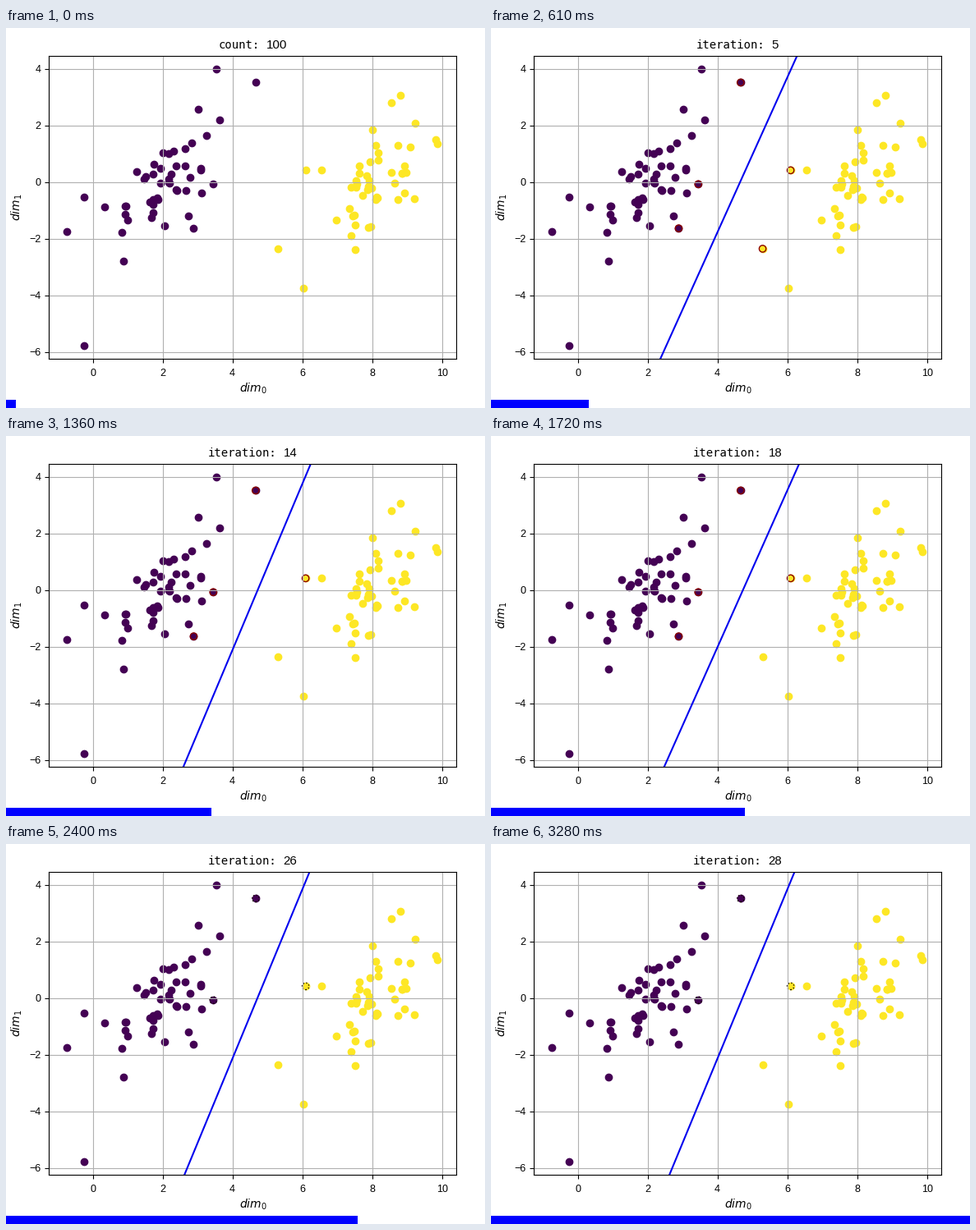
These frames come from a looping animation (583 by 463 pixels, 3350 ms). A matplotlib script:

```python
import numpy as np
import matplotlib.pyplot as plt
from matplotlib.animation import FuncAnimation
from matplotlib.patches import Rectangle

W, H = 583, 463
LOOP, TICK = 3350, 25
STEPS = 49
PURPLE, YELLOW = "#440154", "#fde725"
X_LIM, Y_LIM = (-1.27, 10.39), (-6.26, 4.435)

plt.rcParams["font.family"] = "Liberation Sans"
rng = np.random.default_rng(7)


def cloud(n, mean, spread, corr):
    """Correlated normal points with the far tail cut off."""
    r = np.sqrt(-2 * np.log(1 - 0.85 * rng.random(n)))
    angle = rng.uniform(0, 2 * np.pi, n)
    u, v = r * np.cos(angle), r * np.sin(angle)
    v = corr * u + np.sqrt(1 - corr ** 2) * v
    return np.column_stack([mean[0] + spread[0] * u, mean[1] + spread[1] * v])


# Support vectors, the longest lasting first
support = np.array([(4.66, 3.51), (3.45, -0.08), (6.09, 0.41),
                    (2.89, -1.64), (5.29, -2.36)])
left_rim = [(-0.24, -5.77), (-0.75, -1.74), (-0.24, -0.55), (0.34, -0.89),
            (0.89, -2.8), (3.54, 3.98), (3.03, 2.56), (3.63, 2.19)]
right_rim = [(6.02, -3.75), (8.8, 3.05), (8.55, 2.8), (9.22, 2.07),
             (9.81, 1.5), (9.86, 1.36), (6.54, 0.43), (9.21, -0.6)]
left_class = np.vstack([support[[0, 1, 3]], left_rim,
                        cloud(40, (2.12, 0), (0.8, 1.05), 0.5)])
right_class = np.vstack([support[[2, 4]], right_rim,
                         cloud(39, (8.0, -0.1), (0.62, 1.3), 0.5)])

# Boundary poses: iteration, x at the top edge, x at the bottom edge
POSES = np.array([(5, 6.27, 2.36), (11, 6.16, 2.68), (18, 6.33, 2.47),
                  (23, 6.23, 2.54), (26, 6.2, 2.62)])

fig = plt.figure(figsize=((W + 1e-6) / 100, (H + 1e-6) / 100), dpi=100,
                 facecolor="white")
ax = fig.add_axes([51.5 / W, 59.5 / H, 496 / W, 369 / H])
ax.set(xlim=X_LIM, ylim=Y_LIM, xticks=range(0, 11, 2), yticks=range(-6, 5, 2))
ax.tick_params(axis="x", labelsize=9, pad=4.5)
ax.tick_params(axis="y", labelsize=9, pad=3)
ax.grid(True)

ax.scatter(*left_class.T, color=PURPLE)
ax.scatter(*right_class.T, color=YELLOW)
rings = ax.scatter([], [], s=36, facecolors="none", linewidths=1)
boundary, = ax.plot([], [], color="#0000ee", lw=1.5)


def stage_text(x, y, s="", **style):
    return fig.text(x / W, 1 - y / H, s, va="baseline", **style)


stage_text(300.5, 444, "$dim_0$", size=10, ha="center")
stage_text(17.5, 218.5, "$dim_1$", size=10, ha="center", rotation=90,
           rotation_mode="anchor")
caption = stage_text(0, 24.7, family="DejaVu Sans Mono", size=10, ha="left")
number = stage_text(0, 24.7, size=10.8, ha="right")
bar = fig.add_artist(Rectangle((0, 0), 0, 10 / H, color="#0000ff", lw=0))


def set_title(label, value):
    half = 8.35 * len(f"{label}: {value}") / 2
    caption.set_text(f"{label}:")
    number.set_text(str(value))
    caption.set_x((300 - half) / W)
    number.set_x((300 + half) / W)


def set_rings(it):
    settled = it >= 25
    rings.set_offsets(support[:5 if it < 8 else 3 if settled else 4])
    rings.set_edgecolor("#140800" if settled else "#8b0000")
    rings.set_linestyle(":" if settled else "-")


def set_boundary(it):
    top, bottom = (np.interp(it, POSES[:, 0], POSES[:, c]) for c in (1, 2))
    boundary.set_data([bottom, top], Y_LIM)


def update(k):
    now = (k + 1) * TICK - 1
    step = now * STEPS // LOOP
    bar.set_width((step + 1) / STEPS)

    running = step >= 2
    boundary.set_visible(running)
    rings.set_visible(running)
    if running:
        it = min(4 * (step - 2) // 5, 28)
        set_title("iteration", it)
        set_rings(it)
        set_boundary(it)
    else:
        set_title("count", 100)
    return bar, boundary, rings, caption, number


anim = FuncAnimation(fig, update, frames=LOOP // TICK, interval=TICK,
                     repeat=True, repeat_delay=0, blit=False)
plt.show()
```
